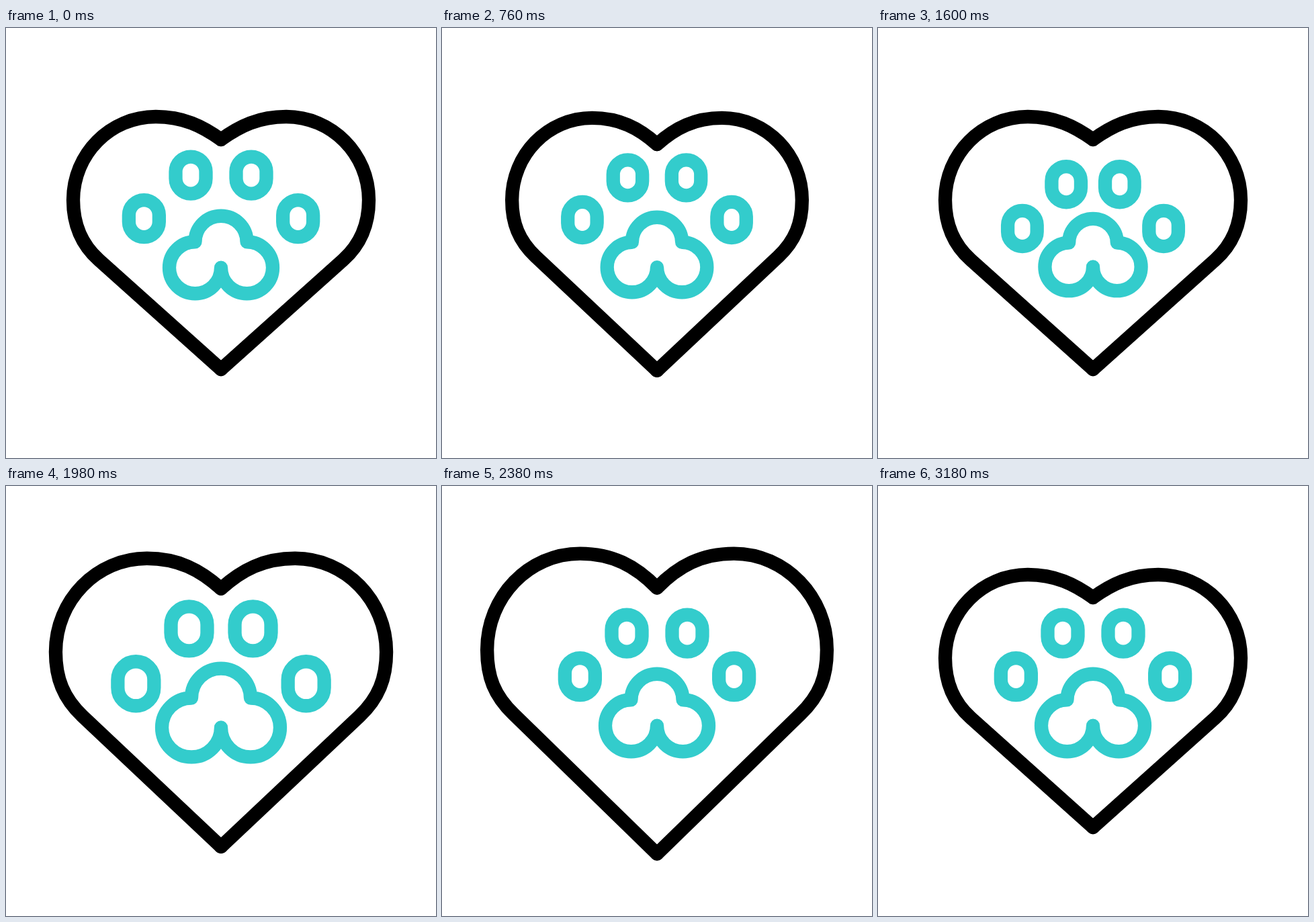
These frames come from a looping animation (640 by 640 pixels, 3.36 s). An HTML page with a canvas:

```html
<!DOCTYPE html>
<html lang="en">
<head>
<meta charset="utf-8">
<title>Paw in a beating heart</title>
<style>
  html, body { margin: 0; height: 100%; overflow: hidden; background: #fff; }
  canvas { display: block; }
</style>
</head>
<body>
<canvas id="stage" width="640" height="640"></canvas>
<script>
const ctx = document.getElementById('stage').getContext('2d');
const LOOP = 3360;
const KAPPA = 0.552; // Bezier handle length of a quarter ellipse

// Smooth progress from 0 to 1 between two times.
function ease(t, from, to) {
  const x = Math.min(1, Math.max(0, (t - from) / (to - from)));
  return x * x * (3 - 2 * x);
}

// One beat around its peak: swell, recoil, rebound, settle.
function beat(t, peak, size) {
  const rise = ease(t, peak - 360, peak);
  const fall = ease(t, peak, peak + 367);
  const rebound = ease(t, peak + 367, peak + 637);
  const settle = ease(t, peak + 637, peak + 982);
  return {
    grow: size * rise - (size + 0.1) * fall + 0.15 * rebound - 0.05 * settle,
    swell: rise - fall
  };
}

// Half a heart around the origin, from tip to notch; m is how swollen it is.
function halfHeart(s, m) {
  const tip = 188 + 18.6 * m, top = -188 - 5.5 * m, notch = -154 + 14 * m;
  const side = -220, sideY = -64 - 4 * m, topX = -97 - 5 * m;
  const cornerX = -182 - 7 * m, cornerY = 25 - 15 * m;
  const handle = 35 / Math.hypot(cornerX, tip - cornerY);
  const path = new Path2D();
  const curve = (...p) => path.bezierCurveTo(...p.map(v => v * s));
  path.moveTo(0, tip * s);
  path.lineTo(cornerX * s, cornerY * s);
  curve(cornerX * (1 + handle), cornerY + (cornerY - tip) * handle,
        side, sideY + 35, side, sideY);
  curve(side, sideY + KAPPA * (top - sideY),
        topX + KAPPA * (side - topX), top, topX, top);
  curve(topX * 0.58, top, -28, notch - 20 - 16 * m, 0, notch);
  return path;
}

function drawHeart(t) {
  const a = beat(t, 528, 0.168), b = beat(t, 2205, 0.37);
  const half = halfHeart(1 + a.grow + b.grow, a.swell + b.swell);
  ctx.strokeStyle = '#000';
  for (const side of [1, -1]) {
    ctx.setTransform(side, 0, 0, 1, 320, 320);
    ctx.stroke(half);
  }
}

function drawPaw(t) {
  const shrink = ease(t, 667, 1200), spread = ease(t, 1200, 1900), rest = ease(t, 1900, 2330);
  const pose = (normal, small, wide) =>
    normal + (small - normal) * shrink + (wide - small) * spread + (normal - wide) * rest;

  ctx.setTransform(1, 0, 0, 1, 320, 337.5);
  ctx.strokeStyle = '#33cccc';
  ctx.beginPath();

  // Pad: three lobes of equal radius.
  const r = 38.5 * pose(1, 0.577, 1.157), lobeY = r / 2;
  ctx.arc(-r, lobeY, r, 0, Math.PI * 1.5);
  ctx.arc(0, lobeY - r, r, Math.PI, 0);
  ctx.arc(r, lobeY, r, -Math.PI / 2, Math.PI);
  ctx.closePath();

  // Toes: capsules on a circle around the pad.
  const size = pose(1, 0.577, 1.22), w = 45 * size, h = 55 * size;
  const orbit = 126.7 * pose(1, 0.61, 1.062);
  for (const angle of [pose(25.2, 23.8, 18.2), 69.2]) {
    const x = orbit * Math.cos(angle * Math.PI / 180);
    const y = -orbit * Math.sin(angle * Math.PI / 180);
    for (const side of [1, -1]) ctx.roundRect(side * x - w / 2, y - h / 2, w, h, w / 2);
  }
  ctx.stroke();
}

function draw() {
  const t = performance.now() % LOOP;
  ctx.resetTransform();
  ctx.fillStyle = '#fff';
  ctx.fillRect(0, 0, 640, 640);
  ctx.lineWidth = 20.3;
  ctx.lineCap = ctx.lineJoin = 'round';
  drawHeart(t);
  drawPaw(t);
  requestAnimationFrame(draw);
}
draw();
</script>
</body>
</html>
```
